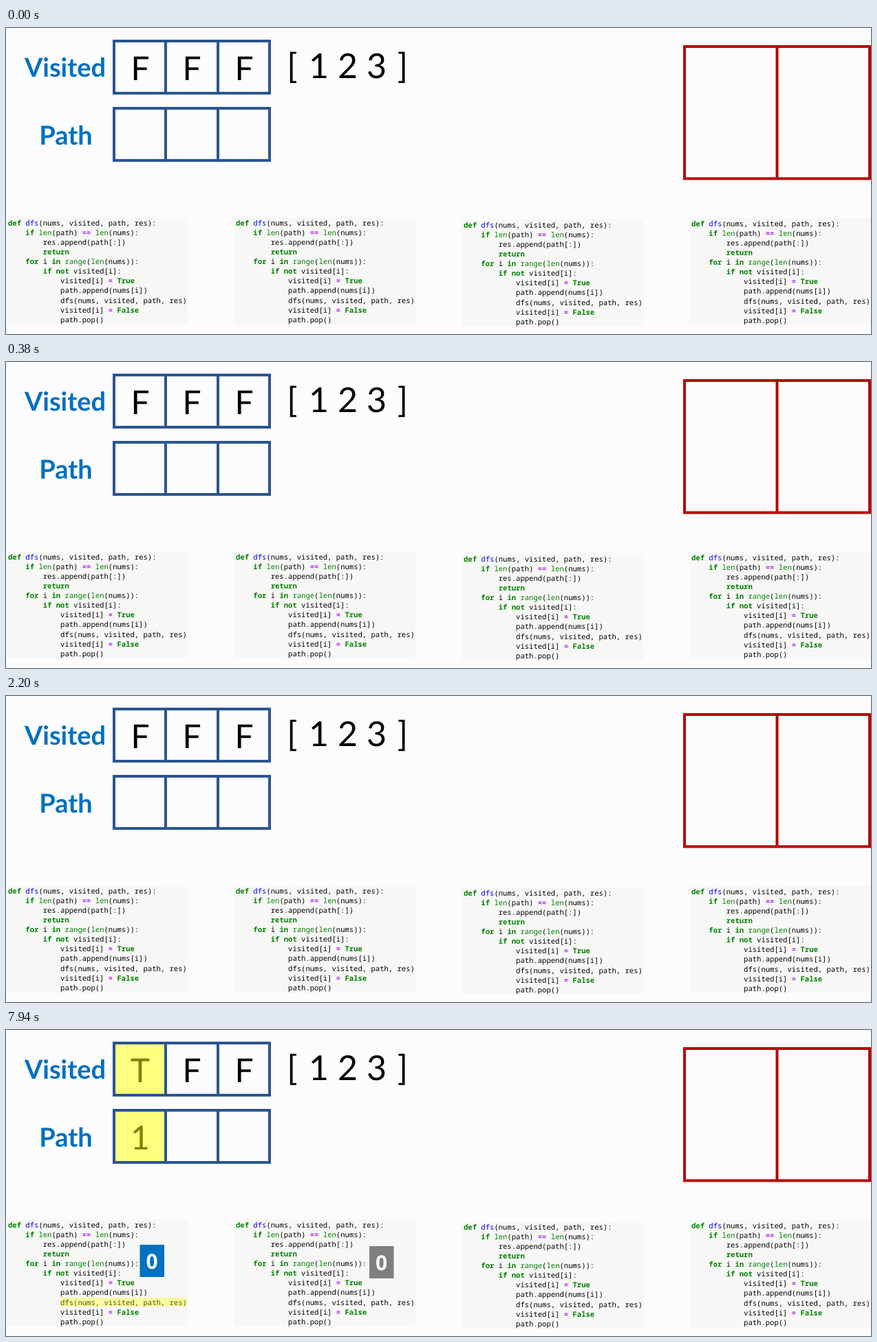
Write an HTML page that moves like this. It is 1257 px wide and 446 px high and loops after 7.99 s.

```html
<!DOCTYPE html>
<html lang="en">
<head>
<meta charset="utf-8">
<title>Depth-first search</title>
<style>
html, body { margin: 0; width: 100%; height: 100%; overflow: hidden; background: #fcfcfe; }
svg { display: block; }
text { font-family: Lato, sans-serif; text-anchor: middle; text-rendering: geometricPrecision; }
.label { font-size: 38px; font-weight: bold; fill: #0070c0; }
.cell { font-size: 48px; }
.list { font-size: 50px; }
.badge { font: bold 30px "Open Sans", sans-serif; fill: #fff; }
.code { font: 10.57px "Noto Sans Mono", monospace; text-anchor: start; white-space: pre; }
.key { fill: #008000; font-weight: bold; }
.builtin { fill: #008000; }
.name { fill: #00f; }
.op { fill: #a2f; font-weight: bold; }
.blue, .red { fill: none; stroke: #2a5592; stroke-width: 4; }
.red { stroke: #b80404; }
</style>
</head>
<body>
<svg id="stage" width="1257" height="446" viewBox="0 0 1257 446"></svg>
<script>
const LOOP = 7990, FADE_START = 2500, FADE_END = 3130, CALL = 7940;

const source = `def dfs(nums, visited, path, res):
    if len(path) == len(nums):
        res.append(path[:])
        return
    for i in range(len(nums)):
        if not visited[i]:
            visited[i] = True
            path.append(nums[i])
            dfs(nums, visited, path, res)
            visited[i] = False
            path.pop()`.split("\n");

const text = (cls, x, y, str) => `<text class="${cls}" x="${x}" y="${y}">${str}</text>`;
const rect = (x, y, w, h, fill) => `<rect x="${x}" y="${y}" width="${w}" height="${h}" fill="${fill}"/>`;
const group = (id, ...parts) => `<g id="${id}">${parts.join("")}</g>`;
const badge = (x, y, fill) => rect(x, y, 35.5, 47, fill) + text("badge", x + 17.5, y + 35, 0);
const glow = (x, y, w, h, alpha) => rect(x, y, w, h, `rgba(255,255,0,${alpha})`);

const colour = line => line.replace(
  /\b(def|if|return|for|in|not|True|False)\b|\b(len|range)\b|(?<=def )(dfs)|(==?)/g,
  (s, key, builtin, name) =>
    `<tspan class="${key ? "key" : builtin ? "builtin" : name ? "name" : "op"}">${s}</tspan>`);

const panel = (x, y) => rect(x, y, 264, 156, "#f7f7f5") +
  source.map((line, i) => text("code", x + 3, y + 11.7 + i * 14.1, colour(line))).join("");

const row = y => `<path class="blue" d="M157 ${y}h226v76h-226zM232 ${y}v76M308 ${y}v76"/>`;

const stage = document.getElementById("stage");
stage.innerHTML = [
  text("label", 86, 71, "Visited"),
  text("label", 87, 170, "Path"),
  text("cell", 270, 75.5, "F"),
  text("cell", 346, 75.5, "F"),
  ...[..."[123]"].map((c, i) => text("list", [416, 454.5, 496.5, 538.5, 576.5][i], 73, c)),
  panel(0, 276), panel(331, 276), panel(662, 279), panel(993, 277),
  group("before", text("cell", 195, 75.5, "F")),
  group("after",
    text("cell", 195, 75.5, "T"), text("cell", 195, 173.5, "1"),
    glow(157, 19, 75, 76, 0.5), glow(157, 117, 75, 76, 0.5),
    badge(194.5, 313, "#0070c0")),
  group("assign", glow(79, 360, 126, 29, 0.35)),
  group("call", glow(79, 390, 184, 13, 0.35), badge(528, 315, "#7f7f7f")),
  row(19), row(117),
  `<path class="red" d="M986 27H1255V219.5H986ZM1120.5 27V219.5"/>`
].join("");

const show = (id, alpha) => document.getElementById(id).setAttribute("opacity", alpha);

function draw() {
  const t = performance.now() % LOOP;
  const p = Math.min(1, Math.max(0, (t - FADE_START) / (FADE_END - FADE_START)));
  const called = t >= CALL;
  show("before", 1 - p);
  show("after", p);
  show("assign", called ? 0 : p);
  show("call", called ? 1 : 0);
  requestAnimationFrame(draw);
}
draw();
</script>
</body>
</html>
```
